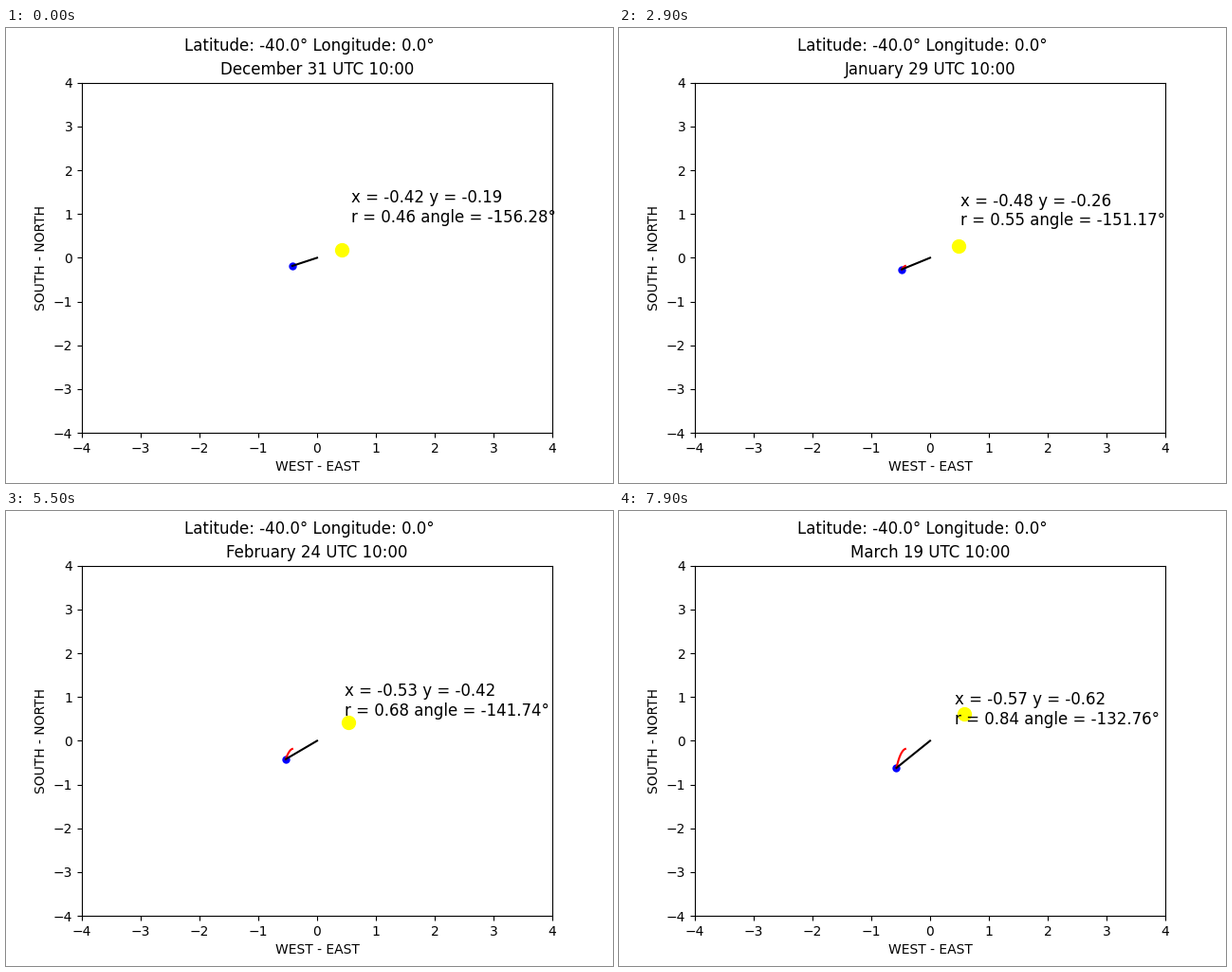
A matplotlib script for the animation above (8000 ms loop, 640 by 480 pixels).

```python
import numpy as np
import matplotlib.pyplot as plt
from matplotlib.animation import FuncAnimation

FRAMES = 80
LAT, LON, HOUR = -40.0, 0.0, 10
TILT = np.radians(23.4366)
MONTHS = [("December", 31), ("January", 31), ("February", 29), ("March", 31)]


def date_label(day):
    """Label for a day counted from December 31."""
    if day == 0:
        return "December 31"
    for name, length in MONTHS[1:]:
        if day <= length:
            return f"{name} {day}"
        day -= length


def shadow(day):
    """Tip of the shadow, (east, north), with a circular orbit."""
    # the solar calendar has no leap day
    n = day + 1 if 0 < day <= 60 else day
    lon = np.radians(n * 360 / 365 - 80.15)
    ra = np.arctan2(np.cos(TILT) * np.sin(lon), np.cos(lon))
    tan_dec = np.tan(TILT) * np.sin(ra)
    hour_angle = np.radians(15 * (HOUR - 12) + LON) + lon - ra

    lat = np.radians(LAT)
    up = np.sin(lat) * tan_dec + np.cos(lat) * np.cos(hour_angle)
    north = np.cos(lat) * tan_dec - np.sin(lat) * np.cos(hour_angle)
    height = np.cos(lat)
    return height * np.sin(hour_angle) / up, -height * north / up


path = np.array([shadow(day) for day in range(FRAMES)])

fig, ax = plt.subplots(figsize=(6.4, 4.8), dpi=100)
fig.suptitle(f"Latitude: {LAT}° Longitude: {LON}°", fontsize=12)
ax.set(xlim=(-4, 4), ylim=(-4, 4), xlabel="WEST - EAST", ylabel="SOUTH - NORTH")
title = ax.set_title("", fontsize=12)

sun, = ax.plot([], [], "o", color="yellow", ms=10)
tip, = ax.plot([], [], "o", color="blue", ms=5)
trace, = ax.plot([], [], color="red", lw=1.5)
stick, = ax.plot([], [], color="black", lw=1.5)
info = ax.text(0, 0, "", fontsize=12)


def update(day):
    x, y = path[day]
    r = np.hypot(x, y)
    angle = np.degrees(np.arctan2(y, x))

    title.set_text(f"{date_label(day)} UTC {HOUR}:00")
    sun.set_data([-x], [-y])
    tip.set_data([x], [y])
    trace.set_data(path[:day + 1, 0], path[:day + 1, 1])
    stick.set_data([0, x], [0, y])
    info.set_position((1 + x, 1 + y))
    info.set_text(f"x = {round(float(x), 2)} y = {round(float(y), 2)}\n"
                  f"r = {round(float(r), 2)} angle = {round(float(angle), 2)}°")
    return title, sun, tip, trace, stick, info


anim = FuncAnimation(fig, update, frames=FRAMES, interval=100, repeat=True,
                     repeat_delay=0, blit=False)
plt.show()
```
